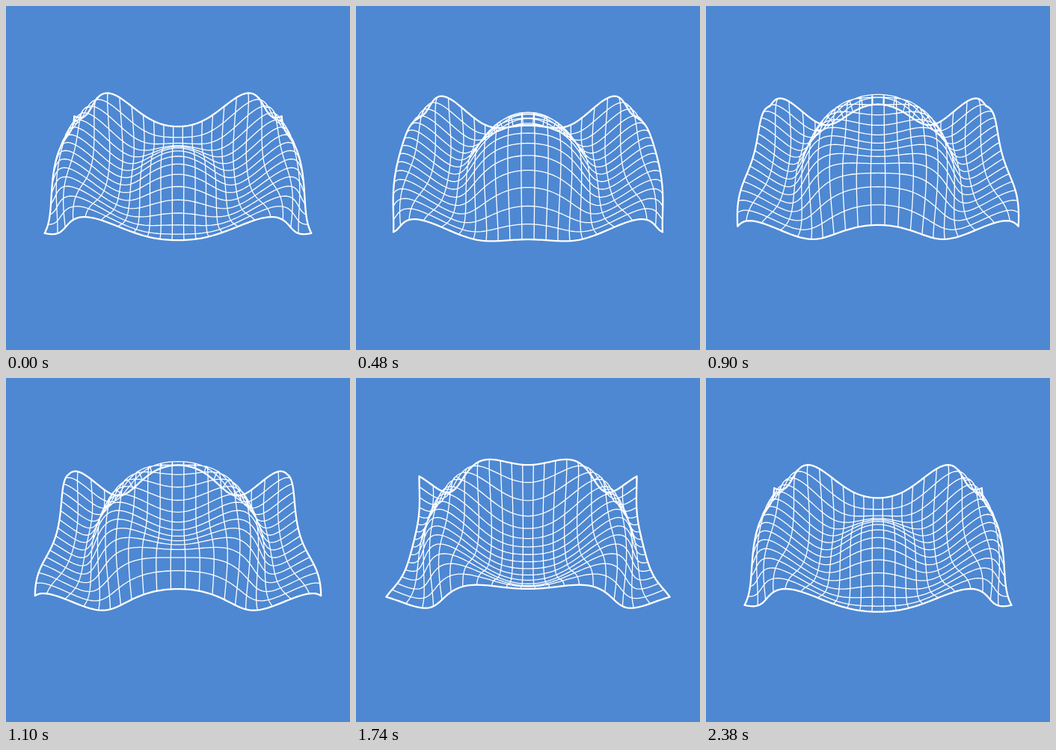
An HTML page with a canvas for the animation above (2400 ms loop, 460 px wide and 460 px high).

```html
<!DOCTYPE html>
<html lang="en">
<head>
<meta charset="utf-8">
<title>Rippling grid</title>
<style>
  html, body { margin: 0; width: 100%; height: 100%; overflow: hidden; background: #4e88d2; }
  canvas { display: block; width: 460px; height: 460px; }
</style>
</head>
<body>
<canvas id="stage" width="460" height="460"></canvas>
<script>
const ctx = document.getElementById('stage').getContext('2d');
const SIZE = 460, LOOP = 2400, RAD = Math.PI / 180;
const COLS = 21, ROWS = 15, STEPS = 100;
const HALF_DEPTH = 0.597;
const FOCAL = SIZE / 2 / Math.tan(30 * RAD);
const DISTANCE = 2.695, LIFT = 0.265;
const SIN = Math.sin(57.7 * RAD), COS = Math.cos(57.7 * RAD);

// Ripple running outwards, fading with the distance from the middle
function height(x, y, phase) {
  const r2 = x * x + y * y;
  return LIFT + 0.412 * Math.exp(-r2) * Math.cos(phase - (88 + 352 * r2) * RAD);
}

function project(x, y, phase) {
  const z = height(x, y, phase);
  const scale = FOCAL / (DISTANCE + y * COS - z * SIN);
  return [SIZE / 2 + x * scale, SIZE / 2 - (y * SIN + z * COS) * scale];
}

// pointAt maps -1..1 to a place on the sheet
function addLine(pointAt, phase) {
  for (let i = 0; i <= STEPS; i++) {
    const [x, y] = pointAt(2 * i / STEPS - 1);
    const p = project(x, y * HALF_DEPTH, phase);
    if (i) ctx.lineTo(...p); else ctx.moveTo(...p);
  }
}

const column = x => v => [x, v];
const row = y => u => [u, y];

function stroke(lines, width, phase) {
  ctx.lineWidth = width;
  ctx.beginPath();
  lines.forEach(line => addLine(line, phase));
  ctx.stroke();
}

const inner = [];
for (let i = 1; i < COLS; i++) inner.push(column(2 * i / COLS - 1));
for (let j = 1; j < ROWS; j++) inner.push(row(2 * j / ROWS - 1));
const border = [column(-1), column(1), row(-1), row(1)];

function draw() {
  const phase = performance.now() % LOOP / LOOP * 2 * Math.PI;
  ctx.fillStyle = '#4e88d2';
  ctx.fillRect(0, 0, SIZE, SIZE);
  ctx.strokeStyle = '#fff';
  ctx.lineJoin = ctx.lineCap = 'round';
  stroke(inner, 1.3, phase);
  stroke(border, 2.3, phase);
  requestAnimationFrame(draw);
}
draw();
</script>
</body>
</html>
```
